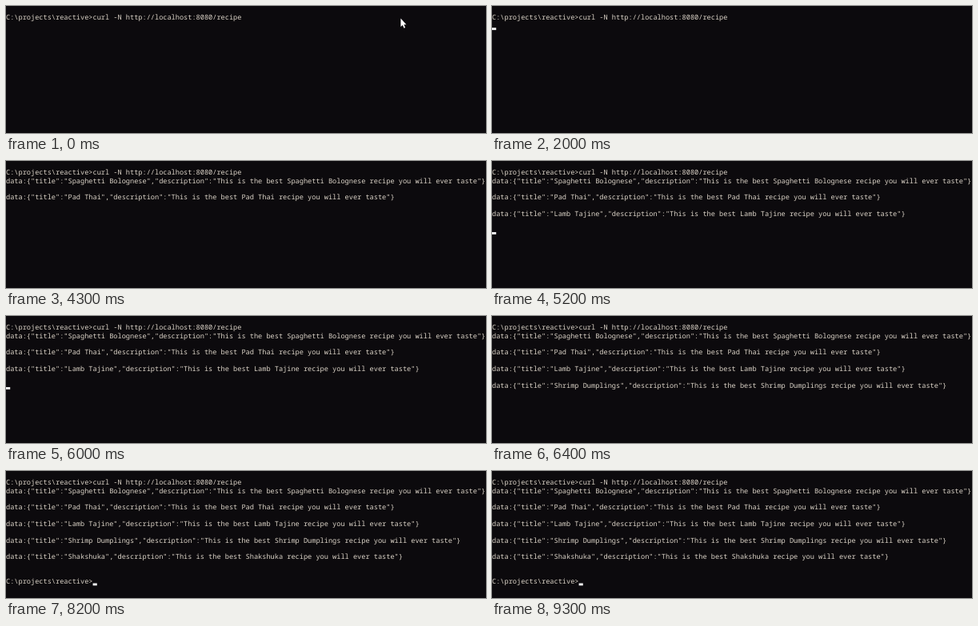
Recreate the animation shown at these times as an HTML page. Size 600 by 159 pixels, loop 9400 ms.

```html
<!DOCTYPE html>
<html lang="en">
<head>
<meta charset="utf-8">
<title>Streaming recipes</title>
<style>
  html, body { margin: 0; width: 100%; height: 100%; overflow: hidden; background: #0c0a0d; }
  svg { display: block; width: 600px; height: 159px; }
  text {
    font: 500 8.617px "Noto Sans Mono", "DejaVu Sans Mono", monospace;
    font-variant-ligatures: none;
    text-rendering: geometricPrecision;
    white-space: pre;
    fill: #dcd4c8;
  }
</style>
</head>
<body>
<svg id="term" viewBox="0 0 600 159">
  <path id="pointer" fill="#fff" d="M493.4 15.6V26.1L495.8 23.9L497.5 27.8L499.1 27.1L497.4 23.3H500.4Z"/>
  <rect id="cursor" width="5.2" height="2.9" fill="#f2f2f2"/>
</svg>
<script>
const LOOP = 9400, CELL = 5.17, ROW = 10.3, BASE = 17.4, CURSOR_TOP = 16.9;
const PROMPT = 'C:\\projects\\reactive>';
const COMMAND = PROMPT + 'curl -N http://localhost:8080/recipe';
const DISHES = ['Spaghetti Bolognese', 'Pad Thai', 'Lamb Tajine', 'Shrimp Dumplings', 'Shakshuka'];

const term = document.getElementById('term');
const pointer = document.getElementById('pointer');
const cursor = document.getElementById('cursor');

function addLine(row, at, str) {
  const el = document.createElementNS('http://www.w3.org/2000/svg', 'text');
  el.setAttribute('x', 0);
  el.setAttribute('y', BASE + row * ROW);
  el.textContent = str;
  term.insertBefore(el, pointer);
  return { el, at };
}

const event = dish => 'data:' + JSON.stringify({
  title: dish,
  description: `This is the best ${dish} recipe you will ever taste`
});

const lines = [
  addLine(0, 0, COMMAND),
  ...DISHES.map((dish, i) => addLine(1 + 2 * i, 3200 + 1000 * i, event(dish))),
  addLine(12, 7400, PROMPT)
];

// Where the cursor sits from a given time on: [time, column, row]
const stops = [
  [0, COMMAND.length, 0], [2000, 0, 1], [3200, 0, 3], [4200, 0, 5],
  [5200, 0, 7], [6200, 0, 9], [7200, 0, 12], [7400, PROMPT.length, 12]
];
// Spans in which the cursor is lit
const lit = [
  [400, 900], [1400, 2500], [3000, 3600], [4000, 4200],
  [4900, 5400], [5900, 6200], [7200, 8400], [8900, LOOP]
];

const show = (el, on) => el.setAttribute('visibility', on ? 'visible' : 'hidden');

function draw(t) {
  lines.forEach(line => show(line.el, t >= line.at));
  show(pointer, t < 1300);
  const [, col, row] = stops.filter(stop => t >= stop[0]).pop();
  cursor.setAttribute('x', col * CELL);
  cursor.setAttribute('y', CURSOR_TOP + row * ROW);
  show(cursor, lit.some(([from, to]) => t >= from && t < to));
}

const start = performance.now();
function tick() {
  draw((performance.now() - start) % LOOP);
  requestAnimationFrame(tick);
}
tick();
</script>
</body>
</html>
```
